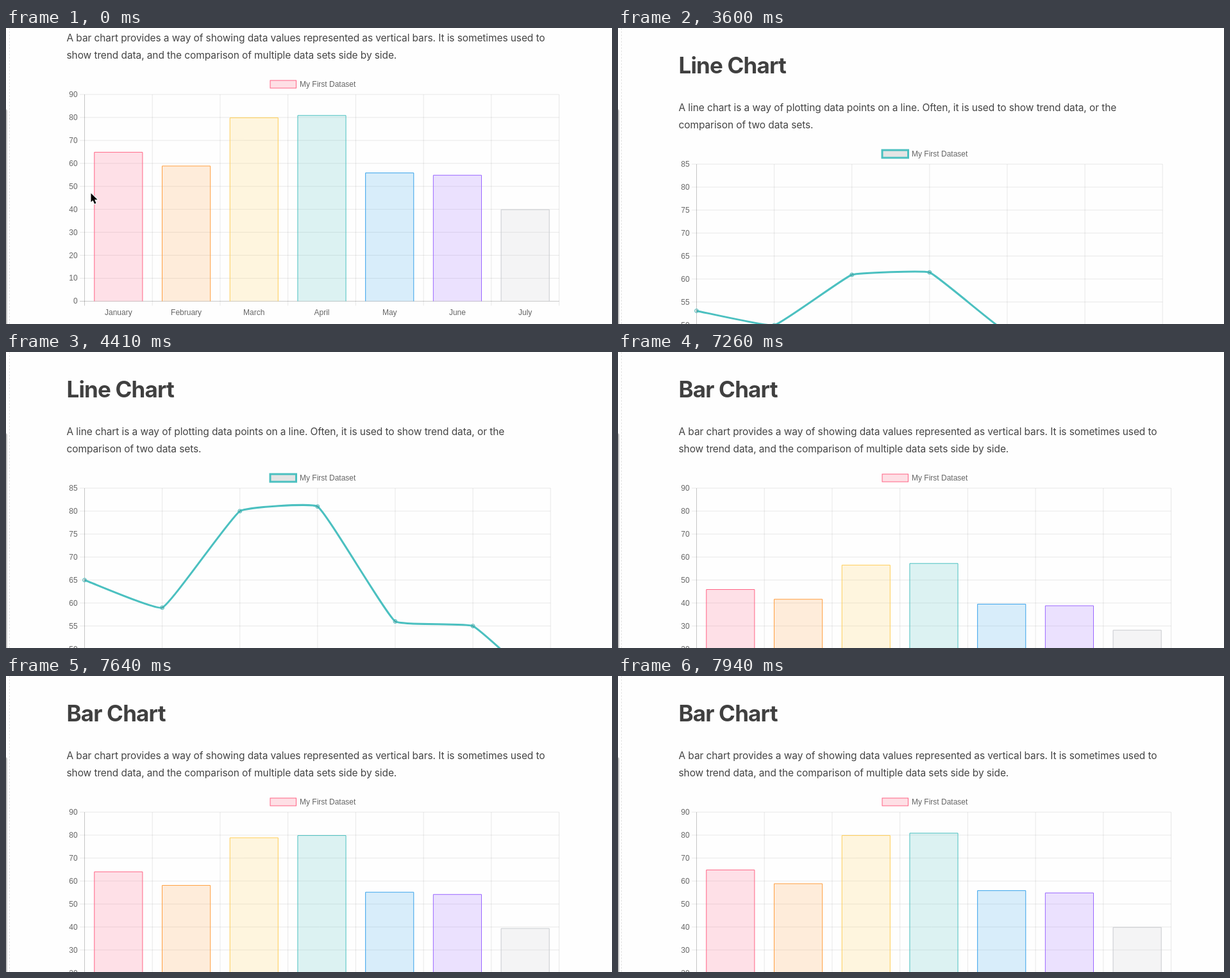
An HTML page with a canvas for the animation above (8000 ms loop, 945 px wide and 463 px high).

```html
<!DOCTYPE html>
<html lang="en">
<head>
<meta charset="utf-8">
<title>Chart demo</title>
<style>
  html, body { margin: 0; overflow: hidden; background: #fefefe; }
  canvas { display: block; }
</style>
</head>
<body>
<canvas id="stage" width="945" height="463"></canvas>
<script>
const ctx = document.getElementById('stage').getContext('2d');
const LOOP = 8000;
const LEFT = 122.5, HEIGHT = 323.4;
const VALUES = [65, 59, 80, 81, 56, 55, 40];
const MONTHS = ['January', 'February', 'March', 'April', 'May', 'June', 'July'];
const COLORS = ['255,99,132', '255,159,64', '255,205,86', '75,192,192',
                '54,162,235', '153,102,255', '201,203,207'];
const TEAL = 'rgb(75,192,192)';
const BAR_TEXT = [
  'A bar chart provides a way of showing data values represented as vertical bars. It is sometimes used to',
  'show trend data, and the comparison of multiple data sets side by side.'];
const LINE_TEXT = [
  'A line chart is a way of plotting data points on a line. Often, it is used to show trend data, or the',
  'comparison of two data sets.'];

// Moments at which the picture refreshes: [ms, linear animation progress]
const LINE_STEPS = [[3600, .169], [3890, .48], [4060, .63], [4200, .77], [4410, 1]];
const BAR_STEPS = [[7260, .265], [7410, .43], [7640, .666], [7790, .8], [7940, 1]];

const easeOutQuart = t => 1 - (1 - t) ** 4;
const progressAt = (steps, ms) => easeOutQuart(steps.filter(s => s[0] <= ms).pop()[1]);

function text(str, x, y, font, color, align = 'left', spacing = 0) {
  ctx.font = font;
  ctx.fillStyle = color;
  ctx.textAlign = align;
  ctx.letterSpacing = spacing + 'px';
  ctx.fillText(str, x, y);
}

const label = (str, x, y, align) =>
  text(str, x, Math.round(y), '12px "Liberation Sans", Arial, sans-serif', '#666', align);

function segment(x1, y1, x2, y2, alpha) {
  ctx.strokeStyle = `rgba(0,0,0,${alpha})`;
  ctx.lineWidth = 1;
  ctx.beginPath();
  ctx.moveTo(x1, y1);
  ctx.lineTo(x2, y2);
  ctx.stroke();
}

function pageEdge() {
  ctx.fillStyle = '#fefefe';
  ctx.fillRect(0, 0, 945, 463);
  ctx.setLineDash([3, 2]);
  segment(5.5, 0, 5.5, 463, .1);
  ctx.setLineDash([]);
  ctx.fillStyle = '#c2c2c2';
  ctx.beginPath();
  ctx.roundRect(-4, 127, 6, 400, 3);
  ctx.fill();
}

function article(title, lines, top) {
  text(title, 94.5, top - 142.5, '700 35px Inter, sans-serif', '#404040', 'left', -.85);
  lines.forEach((line, i) => text(line, 94.5, top - 83 + i * 27,
    '15.5px Inter, sans-serif', '#444', 'left', -.1));
}

function legend(top, fill, stroke, width) {
  ctx.fillStyle = fill;
  ctx.strokeStyle = stroke;
  ctx.lineWidth = width;
  ctx.fillRect(412, top - 22, 40.5, 12);
  ctx.strokeRect(412, top - 22, 40.5, 12);
  label('My First Dataset', 458, top - 12);
}

function grid(top, right, columns, max, step) {
  const bottom = top + HEIGHT;
  for (let i = 0; i <= columns; i++) {
    const x = LEFT + (right - LEFT) * i / columns;
    segment(x, top, x, bottom + 7, i ? .09 : .22);
  }
  for (let i = 0; i <= 9; i++) {
    const y = top + HEIGHT * i / 9, value = max - i * step;
    segment(115, y, right, y, value ? .09 : .22);
    label(value, 111.7, y + 4, 'right');
  }
}

function barChart(top, progress) {
  const right = 862.5, slot = (right - LEFT) / 7, base = top + HEIGHT;
  article('Bar Chart', BAR_TEXT, top);
  legend(top, 'rgba(255,99,132,.2)', 'rgb(255,99,132)', 1);
  grid(top, right, 7, 90, 10);
  VALUES.forEach((value, i) => {
    const center = LEFT + slot * (i + .5), half = slot * .36 - .5;
    const y = base - HEIGHT * value / 90 * progress + .5;
    ctx.beginPath();
    ctx.moveTo(center - half, base);
    ctx.lineTo(center - half, y);
    ctx.lineTo(center + half, y);
    ctx.lineTo(center + half, base);
    ctx.fillStyle = `rgba(${COLORS[i]},.19)`;
    ctx.strokeStyle = `rgb(${COLORS[i]})`;
    ctx.lineWidth = 1;
    ctx.fill();
    ctx.stroke();
    label(MONTHS[i], center, base + 22, 'center');
  });
}

// Bezier handles on both sides of a point, from its neighbours
function handles(points, i) {
  const tension = .1, p = points[i];
  const a = points[i - 1] || p, b = points[i + 1] || p;
  const before = Math.hypot(p.x - a.x, p.y - a.y), after = Math.hypot(b.x - p.x, b.y - p.y);
  const at = k => ({ x: p.x + k * (b.x - a.x), y: p.y + k * (b.y - a.y) });
  return { in: at(-tension * before / (before + after)), out: at(tension * after / (before + after)) };
}

function lineChart(top, progress) {
  const right = 849.2, base = top + HEIGHT, slot = (right - LEFT) / 6;
  article('Line Chart', LINE_TEXT, top);
  legend(top, 'rgba(0,0,0,.1)', TEAL, 3);
  grid(top, right, 6, 85, 5);

  const points = VALUES.map((value, i) => ({
    x: LEFT + slot * i,
    y: top + HEIGHT * (85 - value) / 45
  }));
  // Everything rises from a flat line on the base
  const grow = (p, flatX = p.x) =>
    [flatX + (p.x - flatX) * progress, base + (p.y - base) * progress];
  ctx.strokeStyle = TEAL;
  ctx.lineWidth = 3;
  ctx.beginPath();
  ctx.moveTo(...grow(points[0]));
  for (let i = 1; i < points.length; i++) {
    const from = points[i - 1], to = points[i];
    ctx.bezierCurveTo(...grow(handles(points, i - 1).out, from.x + slot * .1),
      ...grow(handles(points, i).in, to.x - slot * .1), ...grow(to));
  }
  ctx.stroke();

  ctx.fillStyle = 'rgba(0,0,0,.1)';
  ctx.lineWidth = 1;
  for (const p of points) {
    ctx.beginPath();
    ctx.arc(...grow(p), 3, 0, 2 * Math.PI);
    ctx.fill();
    ctx.stroke();
  }
}

function cursor() {
  const arrow = new Path2D('M132.5 258.5V272.3L135.6 269.4L138 275L140.5 274L138.1 268.6H142.6Z');
  ctx.strokeStyle = '#fff';
  ctx.lineWidth = 2;
  ctx.stroke(arrow);
  ctx.fillStyle = '#000';
  ctx.fill(arrow);
}

function draw(now) {
  const ms = now % LOOP;
  pageEdge();
  if (ms < LINE_STEPS[0][0]) {
    barChart(104, 1);
    if (ms < 300) cursor();
  } else if (ms < BAR_STEPS[0][0]) {
    lineChart(213, progressAt(LINE_STEPS, ms));
  } else {
    barChart(213, progressAt(BAR_STEPS, ms));
  }
}

const start = performance.now();
(function frame() {
  draw(performance.now() - start);
  requestAnimationFrame(frame);
})();
</script>
</body>
</html>
```
